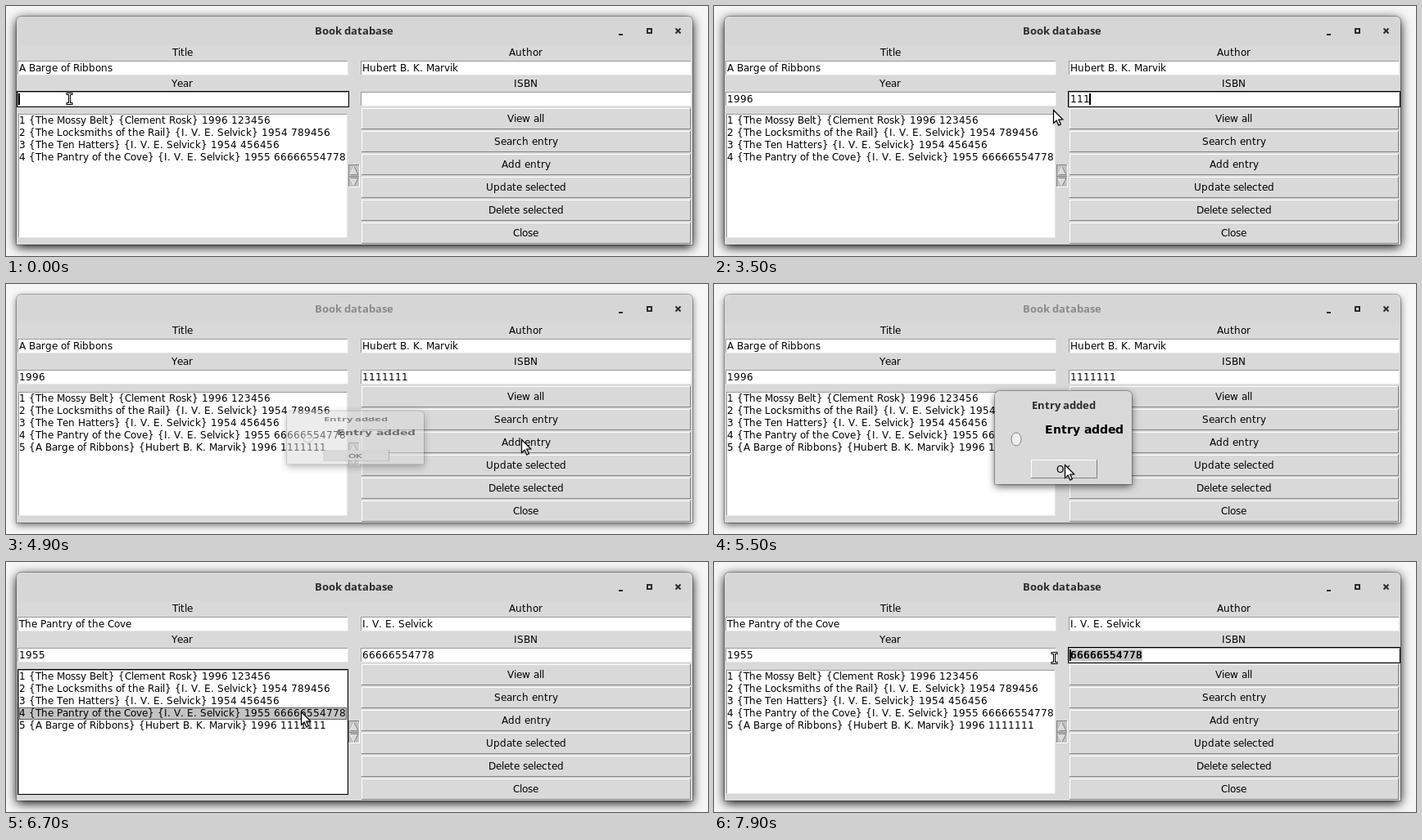
Write an HTML page with a canvas that moves like this. It is 857 px wide and 306 px high and loops after 8 s.

```html
<!DOCTYPE html>
<html lang="en">
<head>
<meta charset="utf-8">
<title>Book database</title>
<style>
html, body { margin: 0; width: 100%; height: 100%; overflow: hidden; background: #f6f6f6; }
canvas { display: block; }
</style>
</head>
<body>
<canvas id="stage" width="857" height="306"></canvas>
<script>
const ctx = document.getElementById('stage').getContext('2d');
const LOOP = 8000, STEP = 100;
const FACE = '#d9d9d9', DARK = '#828282', INK = '#2b2b2b', SELECTED = '#c3c3c3';
const FIELD_LIGHT = '#e5e5e5', FIELD_DARK = '#999';
const UI = '12px "DejaVu Sans", sans-serif';
const CAPTION = 'bold 13px "Noto Sans", sans-serif';
const MESSAGE = 'bold 14px "DejaVu Sans", sans-serif';

const BOOKS = [
  ['The Mossy Belt', 'Clement Rosk', '1996', '123456'],
  ['The Locksmiths of the Rail', 'I. V. E. Selvick', '1954', '789456'],
  ['The Ten Hatters', 'I. V. E. Selvick', '1954', '456456'],
  ['The Pantry of the Cove', 'I. V. E. Selvick', '1955', '66666554778'],
  ['A Barge of Ribbons', 'Hubert B. K. Marvik', '1996', '1111111'],
];
const BUTTONS = ['View all', 'Search entry', 'Add entry', 'Update selected', 'Delete selected', 'Close'];

// Moments of the user's actions
const ADD = 4700, POPUP_SHUT = 5820, PICK = 6500, DRAG = 7400;
const POINTER_HOME = { x: 77, y: 113 };
const MOVES = [
  { from: 1800, to: 2000, x: 495, y: 117 },
  { from: 2300, to: 2400, x: 414, y: 127 },
  { from: 4200, to: 4500, x: 629, y: 190 },
  { from: 5000, to: 5400, x: 428, y: 221 },
  { from: 5700, to: 5800, x: 460, y: 220 },
  { from: 6000, to: 6400, x: 360, y: 183 },
  { from: 6800, to: 7200, x: 526, y: 117 },
  { from: DRAG, to: 7900, x: 415, y: 117 },
];

const clamp = (v, lo = 0, hi = 1) => Math.max(lo, Math.min(hi, v));
const smooth = p => p * p * (3 - 2 * p);

function pointerAt(t) {
  let { x, y } = POINTER_HOME;
  for (const move of MOVES) {
    const p = smooth(clamp((t - move.from) / (move.to - move.from)));
    x += (move.x - x) * p;
    y += (move.y - y) * p;
  }
  return [x, y];
}

// Year: one digit, a pause, then the rest; ISBN: steady key repeat
function typedYear(t) {
  const rest = t < 1000 ? 0 : 1 + Math.floor((t - 950) / 150);
  return t < 500 ? 0 : 1 + Math.min(rest, t < 1400 ? 2 : 3);
}
const typedIsbn = t => Math.max(0, Math.floor((t - 3200) / 150) + 1);

function box(x, y, w, h, color) {
  ctx.fillStyle = color;
  ctx.fillRect(x, y, w, h);
}

function bevel(x, y, w, h, topLeft, bottomRight, fill) {
  box(x, y, w, h, bottomRight);
  box(x, y, w - 1, h - 1, topLeft);
  box(x + 1, y + 1, w - 2, h - 2, fill);
}

function path(...points) {
  ctx.beginPath();
  points.forEach(([x, y]) => ctx.lineTo(x, y));
}

// Whole-pixel advances, like the toolkit's hinted text
const advance = ch => Math.round(ctx.measureText(ch).width);

function label(text, x, y, { centered = false, font = UI, color = '#000' } = {}) {
  ctx.font = font;
  ctx.fillStyle = color;
  if (centered) x = Math.floor(x - [...text].reduce((sum, ch) => sum + advance(ch), 0) / 2);
  for (const ch of text) {
    ctx.fillText(ch, x, y);
    x += advance(ch);
  }
  return x;
}

const centered = (text, x, y) => label(text, x, y, { centered: true });

// The shadow is kept outside so that a translucent window stays light
function drawWindow(x, y, w, h, blur, strength) {
  const outline = new Path2D();
  outline.roundRect(x, y, w, h, [6, 6, 0, 0]);
  const outside = new Path2D(outline);
  outside.rect(0, -400, 857, 1200);
  ctx.save();
  ctx.clip(outside, 'evenodd');
  ctx.shadowColor = `rgba(0,0,0,${strength})`;
  ctx.shadowBlur = blur;
  ctx.shadowOffsetY = 3;
  ctx.fillStyle = FACE;
  ctx.fill(outline);
  ctx.restore();
  ctx.fillStyle = FACE;
  ctx.fill(outline);
  ctx.strokeStyle = 'rgba(0,0,0,.25)';
  ctx.lineWidth = 1;
  ctx.beginPath();
  ctx.roundRect(x - 0.5, y - 0.5, w + 1, h + 1, [6, 6, 0, 0]);
  ctx.stroke();
}

function drawFrame(active) {
  box(0, 0, 857, 306, '#f6f6f6');
  drawWindow(13, 13, 825, 279, active ? 13 : 9, active ? 1 : 0.6);
  box(14, 19, 823, 29, '#d6d6d6');
  box(19, 14, 813, 5, '#d6d6d6');
  label('Book database', 425, 35, { centered: true, font: CAPTION, color: active ? INK : '#8a8a8a' });
  box(748, 34, 5, 2, INK);
  ctx.strokeStyle = INK;
  ctx.lineWidth = 2;
  ctx.strokeRect(783, 28, 5, 5);
  for (const d of [-3, 3]) {
    path([820.5 - d, 27.5], [820.5 + d, 33.5]);
    ctx.stroke();
  }
}

function drawEntry(x, y, text, focused, caretOn, selectFrom) {
  box(x, y, 406, 20, focused ? '#000' : FACE);
  bevel(x + 1, y + 1, 404, 18, FIELD_DARK, FIELD_LIGHT, '#fff');
  const start = x + 3, base = y + 14;
  let caret = label(text, start, base);
  if (selectFrom < text.length) {
    const from = start + 8 * selectFrom;
    box(from, y + 3, caret - from, 14, SELECTED);
    for (let pass = 0; pass < 3; pass++) label(text.slice(selectFrom), from, base);
    caret = from;
  }
  if (focused && caretOn) box(caret - 1, y + 3, 2, 14, '#000');
}

function drawList(count, focused, selected) {
  box(14, 131, 404, 154, focused ? '#000' : FACE);
  bevel(15, 132, 402, 152, FIELD_DARK, FIELD_LIGHT, '#fff');
  if (selected) {
    box(16, 178, 400, 15, SELECTED);
    if (focused) {
      ctx.strokeStyle = '#000';
      ctx.lineWidth = 1;
      ctx.setLineDash([1, 1]);
      ctx.strokeRect(16.5, 178.5, 399, 14);
      ctx.setLineDash([]);
    }
  }
  ctx.save();
  ctx.beginPath();
  ctx.rect(16, 133, 400, 150);
  ctx.clip();
  BOOKS.slice(0, count).forEach(([title, author, year, isbn], i) =>
    label(`${i + 1} {${title}} {${author}} ${year} ${isbn}`, 16, 144 + 15 * i));
  ctx.restore();
}

function drawScrollbar() {
  bevel(418, 194, 14, 28, DARK, '#fff', SELECTED);
  ctx.lineWidth = 1;
  for (const [tip, base] of [[196.5, 206.5], [220.5, 210.5]]) {
    path([420, base], [425, tip], [430, base]);
    ctx.closePath();
    ctx.fillStyle = FACE;
    ctx.fill();
    ctx.strokeStyle = DARK;
    ctx.stroke();
    path([420, base], [425, tip]);
    ctx.strokeStyle = '#fff';
    ctx.stroke();
  }
  box(419, 208, 12, 1, DARK);
}

function drawButtons(px, py, active) {
  BUTTONS.forEach((text, i) => {
    const y = 125 + 28 * i;
    const hover = active && px > 433 && px < 836 && py >= y && py < y + 26;
    bevel(434, y, 402, 26, '#fff', DARK, hover ? '#ececec' : FACE);
    centered(text, 635, y + 17);
  });
}

function drawPopup(t) {
  const openness = clamp(Math.min((t - ADD) / 400, (POPUP_SHUT - t) / 220));
  if (!openness) return;
  ctx.save();
  ctx.globalAlpha = openness;
  ctx.translate(427, 188);
  ctx.scale(1, 0.14 + 0.86 * openness);
  ctx.translate(-427, -188);
  drawWindow(343, 131, 167, 114, 10, 0.6);
  label('Entry added', 427, 153, { centered: true, font: CAPTION, color: INK });
  ctx.fillStyle = '#eee';
  ctx.strokeStyle = DARK;
  ctx.beginPath();
  ctx.ellipse(369, 190, 6, 8, 0, 0, 2 * Math.PI);
  ctx.fill();
  ctx.stroke();
  label('Entry added', 404, 183, { font: MESSAGE });
  bevel(387, 215, 81, 23, '#fff', DARK, FACE);
  centered('OK', 427, 231);
  ctx.restore();
}

function drawBeam() {
  for (const [color, width, half] of [['#000', 3, 4], ['#fff', 1, 3]]) {
    ctx.strokeStyle = color;
    ctx.lineWidth = width;
    for (const y of [-6, 6]) {
      path([-half, y], [half, y]);
      ctx.stroke();
    }
    path([0, -6], [0, 6]);
    ctx.stroke();
  }
}

function drawArrow() {
  path([0, 0], [0, 16], [3.7, 12.6], [6.3, 18.4], [8.8, 17.2], [6.2, 11.6], [11.2, 11.3]);
  ctx.closePath();
  ctx.shadowColor = 'rgba(0,0,0,.35)';
  ctx.shadowBlur = 2;
  ctx.shadowOffsetY = 1;
  ctx.fillStyle = '#fff';
  ctx.fill();
  ctx.shadowColor = 'transparent';
  ctx.strokeStyle = '#000';
  ctx.lineWidth = 1.2;
  ctx.stroke();
}

function drawPointer(x, y) {
  const inRow = [66, 104].some(top => y >= top && y < top + 20);
  const inEntry = inRow && [13, 432].some(left => x >= left && x < left + 406);
  ctx.save();
  ctx.translate(Math.round(x) + 0.5, Math.round(y) + 0.5);
  if (inEntry) drawBeam();
  else drawArrow();
  ctx.restore();
}

function focusAt(t) {
  if (t < 2300) return ['year', 0];
  if (t < ADD + STEP) return ['isbn', 2300];
  if (t < 5700) return ['popup', 0];
  if (t < PICK) return ['isbn', 5700];
  if (t < DRAG) return ['list', 0];
  return ['isbn', DRAG];
}

function render(t) {
  const [px, py] = pointerAt(t);
  const [focus, since] = focusAt(t);
  const active = focus !== 'popup';
  const caretOn = (t - since) % 900 < 600;
  const picked = t >= PICK;
  const [title, author, year, isbn] = BOOKS[picked ? 3 : 4];
  const selectFrom = t >= DRAG ? clamp(Math.round((px - 435) / 8), 0, 11) : Infinity;

  drawFrame(active);
  centered('Title', 215.5, 61);
  centered('Author', 634.5, 61);
  centered('Year', 215.5, 99);
  centered('ISBN', 634.5, 99);
  drawEntry(13, 66, title);
  drawEntry(432, 66, author);
  drawEntry(13, 104, picked ? year : year.slice(0, typedYear(t)), focus === 'year', caretOn);
  drawEntry(432, 104, picked ? isbn : isbn.slice(0, typedIsbn(t)), focus === 'isbn', caretOn, selectFrom);
  drawList(t >= ADD ? 5 : 4, focus === 'list', picked && !(selectFrom < 11));
  drawScrollbar();
  drawButtons(px, py, active);
  drawPopup(t);
  drawPointer(px, py);
}

function tick() {
  const t = performance.now() % LOOP;
  render(Math.floor(t / STEP) * STEP);
  requestAnimationFrame(tick);
}
tick();
</script>
</body>
</html>
```
